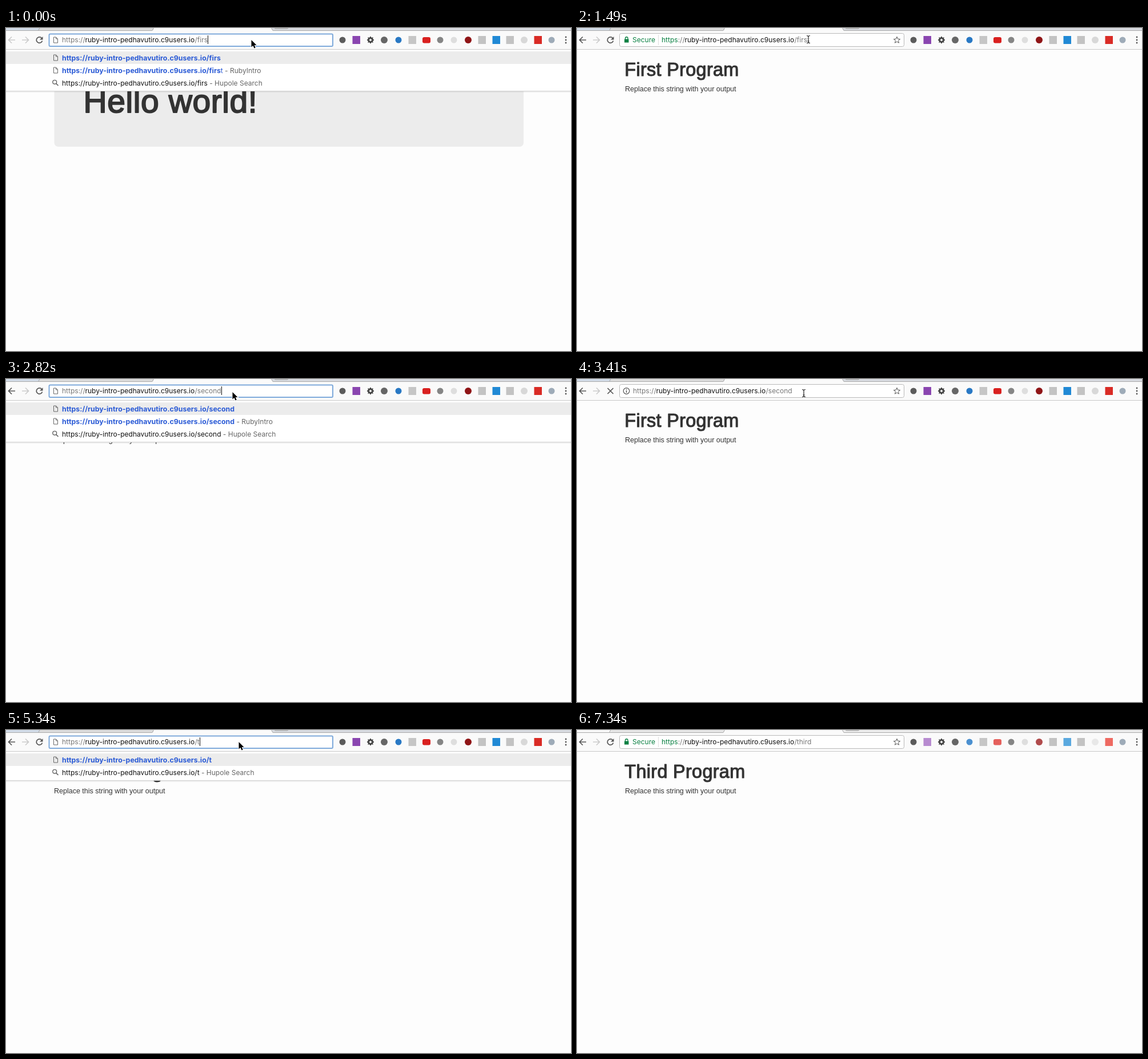
Write an HTML page with a canvas that moves like this. It is 989 px wide and 566 px high and loops after 7440 ms.

```html
<!DOCTYPE html>
<html lang="en">
<head>
<meta charset="utf-8">
<title>Browser walkthrough</title>
<style>
html, body { margin: 0; width: 100%; height: 100%; overflow: hidden; background: #fdfdfd; }
canvas { display: block; }
</style>
</head>
<body>
<canvas id="stage" width="989" height="566"></canvas>
<script>
const g = document.getElementById('stage').getContext('2d');
const LOOP = 7440;
const HOST = 'ruby-intro-pedhavutiro.c9users.io';
const UI = '12px Inter, Roboto, sans-serif';
const UI_BOLD = 'bold 12.35px Inter, Roboto, sans-serif';
const PAGE = '"Liberation Sans", Arial, sans-serif';
const GREY = '#777', DARK = '#555', PALE = '#cbcbcb', GREEN = '#0b8043', BLUE = '#2b5bd6';

// Each step changes only what it lists; everything else carries over.
// cursor: [kind, x, y], mode: 'edit' | 'info' | 'secure'
const steps = [
  [0, { page: 'Hello', path: 'firs', full: 'first', mode: 'edit', rows: 3, focus: 1,
        back: 0, loading: 0, selected: 0, pale: 0, cursor: ['arrow', 429.5, 21] }],
  [150, { path: 'first' }],
  [300, { mode: 'info', rows: 0, focus: 0, loading: 1, cursor: ['beam', 430, 24] }],
  [600, { cursor: ['beam', 424, 20] }],
  [750, { mode: 'secure', back: 1, cursor: ['beam', 416, 17] }],
  [900, { cursor: ['beam', 412, 17] }],
  [1050, { page: 'First Program' }],
  [1200, { loading: 0 }],
  [1340, { cursor: ['beam', 409, 18] }],
  [1490, { cursor: ['beam', 405, 20] }],
  [1640, { cursor: ['beam', 400, 23] }],
  [1780, { cursor: ['beam', 397, 25] }],
  [1930, { focus: 1, cursor: ['arrow', 396.5, 23] }],
  [2080, { selected: 1 }],
  [2530, { selected: 0, mode: 'edit', rows: 3, path: 's', full: 'second' }],
  [2680, { path: 'seco' }],
  [2820, { path: 'second' }],
  [3110, { mode: 'info', rows: 0, focus: 0, loading: 1, cursor: ['beam', 397, 25] }],
  [4000, { mode: 'secure', page: 'Second Program' }],
  [4150, { loading: 0, cursor: ['beam', 399, 18] }],
  [4300, { cursor: ['beam', 403, 10] }],
  [4440, { cursor: ['beam', 408, 23] }],
  [4590, { focus: 1, cursor: ['arrow', 407.5, 21] }],
  [4740, { selected: 1 }],
  [5340, { selected: 0, mode: 'edit', rows: 2, path: 't', full: 'third' }],
  [5480, { path: 'third' }],
  [5780, { mode: 'info', rows: 0, focus: 0, loading: 1, cursor: ['beam', 408, 23] }],
  [6080, { mode: 'secure' }],
  [6220, { page: 'Third Program' }],
  [6370, { loading: 0, cursor: ['arrow', 425, 70] }],
  [6520, { cursor: ['arrow', 470, 210] }],
  [6670, { cursor: ['arrow', 540, 400] }],
  [6820, { cursor: null }],
  [7340, { pale: 1 }]
];

function stateAt(t) {
  return Object.assign({}, ...steps.filter(s => s[0] <= t).map(s => s[1]));
}

function rect(x, y, w, h, color) {
  g.fillStyle = color;
  g.fillRect(x, y, w, h);
}

function box(x, y, w, h, r, fill, stroke, width = 1) {
  g.beginPath();
  g.roundRect(x, y, w, h, r);
  if (fill) { g.fillStyle = fill; g.fill(); }
  if (stroke) { g.strokeStyle = stroke; g.lineWidth = width; g.stroke(); }
}

function disc(x, y, r, color) {
  g.fillStyle = color;
  g.beginPath();
  g.arc(x, y, r, 0, 7);
  g.fill();
}

function ring(x, y, r, color, width, from = 0, to = 2 * Math.PI) {
  g.strokeStyle = color;
  g.lineWidth = width;
  g.beginPath();
  g.arc(x, y, r, from, to);
  g.stroke();
}

function line(d, color, width = 1) {
  g.strokeStyle = color;
  g.lineWidth = width;
  g.stroke(new Path2D(d));
}

// Draws text and returns the x where it ends.
function text(s, x, y, color, font = UI) {
  g.font = font;
  g.fillStyle = color;
  g.fillText(s, x, y);
  return x + g.measureText(s).width;
}

// Regular text thickened to a medium weight.
function heading(s, x, y, size) {
  g.save();
  g.letterSpacing = size / 100 + 'px';
  text(s, x, y, '#333', size + 'px ' + PAGE);
  g.strokeStyle = '#333';
  g.lineWidth = size / 29;
  g.lineJoin = 'round';
  g.strokeText(s, x, y);
  g.restore();
}

function drawPage(s) {
  rect(0, 0, 989, 566, '#fdfdfd');
  if (s.page === 'Hello') {
    box(84.5, 38, 821.5, 170, 7, '#ececec');
    heading('Hello world!', 135.5, 148.3, 57);
  } else {
    heading(s.page, 83.3, 83.8, 32.4);
    text('Replace this string with your output', 84, 111, '#333', '12.5px ' + PAGE);
  }
}

function drawTabs(s) {
  rect(0, 0, 989, 38, '#fafafa');
  rect(0, 0, 989, 4, s.pale ? '#ededed' : '#d8dbe0');
  rect(0, 0, 58, 4, s.pale ? '#f8f8f8' : '#d2dce8');
  rect(60, 0, 197, 4, s.pale ? '#e6e6e6' : '#dcdcdc');
  rect(258, 0, 208, 5, '#fafafa');
  line('M0 4.5H256L258.5 0M56.5 4.5L59 0M464.5 0L467 4.5H989', '#a9a9a9');
  box(470, -4, 24, 5, 2, '#d0d0d0', '#a0a0a0');
  rect(0, 37, 989, 1, '#c9c9c9');
}

function drawNav(s) {
  line('M16 21H4.5M10 15.5L4.5 21L10 26.5', s.back ? DARK : PALE, 1.7);
  line('M28 21H39.5M34 15.5L39.5 21L34 26.5', PALE, 1.7);
  if (s.loading) {
    line('M53.5 16L63.5 26M63.5 16L53.5 26', DARK, 1.7);
  } else {
    ring(58.5, 21, 5.2, DARK, 1.7, 0.3, 5.5);
    g.fillStyle = DARK;
    g.fill(new Path2D('M64.5 15V20.5H59Z'));
  }
}

function docIcon(y) {
  line(`M83.5 ${y - 5}H87.5L90.5 ${y - 2}V${y + 5}H83.5ZM87.5 ${y - 5}V${y - 2}H90.5`, '#666');
}

function drawStar() {
  g.beginPath();
  for (let i = 0; i < 10; i++) {
    const a = i * Math.PI / 5, r = i % 2 ? 2.6 : 6;
    g.lineTo(560 + r * Math.sin(a), 21.3 - r * Math.cos(a));
  }
  g.closePath();
  g.strokeStyle = DARK;
  g.lineWidth = 1;
  g.stroke();
}

function drawOmnibox(s) {
  if (s.focus) box(75.5, 10.5, 496.5, 21.5, 2, '#fff', '#7faadb', 2);
  else box(74.5, 9.5, 498, 23, 3, '#fff', '#b9b9b9');

  const secure = s.mode === 'secure';
  const x = secure ? 148 : 98;
  if (secure) {
    rect(83, 19.5, 7.5, 6, GREEN);
    line('M84.5 20V18A2.2 2.2 0 0 1 89 18V20', GREEN, 1.3);
    text('Secure', 97, 25, GREEN);
    rect(142, 12, 1, 18, '#dedede');
  } else if (s.mode === 'info') {
    ring(86.5, 21, 5.3, DARK, 1.2);
    rect(85.8, 20, 1.4, 4, DARK);
    rect(85.8, 17.5, 1.4, 1.4, DARK);
  } else {
    docIcon(21);
  }

  const afterScheme = text('https', x, 25, secure ? GREEN : GREY);
  text('://', afterScheme, 25, GREY);
  text(HOST, x + 40.5, 25, '#111');
  const slashEnd = text('/', x + 232.5, 25, GREY);
  const width = g.measureText(s.path).width;
  if (s.selected) rect(slashEnd - 0.5, 13, width + 1, 15, '#a9cdf4');
  text(s.path, slashEnd, 25, s.selected ? '#5c6f85' : GREY);
  if (s.mode === 'edit') rect(Math.round(slashEnd + width), 13, 1, 15, '#111');
  else drawStar();
}

function drawExtensions(s) {
  const soft = (strong, faded) => s.pale ? faded : strong;
  const disk = (x, c, r = 5.5) => disc(x, 21, r, c);
  const tile = (x, c) => rect(x - 6.5, 14, 13.5, 14, c);
  disk(589, '#5b5b5b');
  tile(613, soft('#8a45b0', '#b78bd0'));
  ring(638, 21, 3.4, '#444', 2.8);
  for (let i = 0; i < 8; i++) {
    const a = i * Math.PI / 4;
    rect(637 + 5 * Math.cos(a), 20 + 5 * Math.sin(a), 2, 2, '#444');
  }
  disk(662, '#666', 6);
  disk(687, soft('#2878c4', '#4b90d0'));
  tile(711, '#c6c6c6');
  box(729, 16, 14, 10.5, 3, soft('#d9201f', '#e5605c'));
  disk(760, '#858585');
  disk(784, '#dedede');
  disk(809, soft('#8f1416', '#b04a4b'), 6);
  tile(833, '#c3c3c3');
  tile(858, soft('#2089d5', '#5aa9df'));
  tile(882, '#c3c3c3');
  disk(907, soft('#d8d8d8', '#e8e8e8'), 6);
  tile(931, soft('#d92b25', '#ee6a62'));
  disk(955, '#9eabb8');
  for (const y of [16, 21, 26]) disc(980, y, 1.4, DARK);
}

function drawSuggestions(s) {
  const bottom = 44 + 22 * s.rows;
  const url = 'https://' + HOST + '/';
  rect(0, 38, 989, bottom - 38, '#fff');
  rect(0, bottom, 989, 1, '#d2d2d2');
  rect(0, bottom + 1, 989, 2, 'rgba(0,0,0,.06)');
  rect(0, 41, 989, 22, '#ececec');
  docIcon(52);
  text(url + s.path, 98, 56.5, BLUE, UI_BOLD);
  if (s.rows === 3) {
    docIcon(74);
    let x = text(url + s.path, 98, 78.5, BLUE, UI_BOLD);
    x = text(s.full.slice(s.path.length), x, 78.5, BLUE);
    text(' - RubyIntro', x, 78.5, '#666');
  }
  const y = bottom - 14;
  ring(85.2, y - 1.2, 3.4, '#666', 1.4);
  line(`M87.7 ${y + 1.3}L91.5 ${y + 5}`, '#666', 1.7);
  const end = text(url + s.path, 98, y + 4.5, '#111');
  text(' - Hupole Search', end, y + 4.5, '#666');
}

function drawCursor([kind, x, y]) {
  g.save();
  g.translate(x, y);
  if (kind === 'arrow') {
    const arrow = new Path2D('M0 0V12.5L2.9 9.8L5 14.5L7.2 13.5L5.2 9H9Z');
    g.strokeStyle = '#fff';
    g.lineWidth = 2;
    g.stroke(arrow);
    g.fillStyle = '#000';
    g.fill(arrow);
  } else {
    const beam = 'M-3 -6.5Q0 -6.5 0 -4.5Q0 -6.5 3 -6.5M0 -5V5M-3 6.5Q0 6.5 0 4.5Q0 6.5 3 6.5M-1.5 3H1.5';
    line(beam, '#fff', 2.5);
    line(beam, '#222', 1.2);
  }
  g.restore();
}

function frame(now) {
  const s = stateAt((now - start) % LOOP);
  drawPage(s);
  drawTabs(s);
  drawNav(s);
  drawOmnibox(s);
  drawExtensions(s);
  if (s.rows) drawSuggestions(s);
  if (s.cursor) drawCursor(s.cursor);
  requestAnimationFrame(frame);
}

const start = performance.now();
requestAnimationFrame(now => frame(Math.max(now, start)));
</script>
</body>
</html>
```
